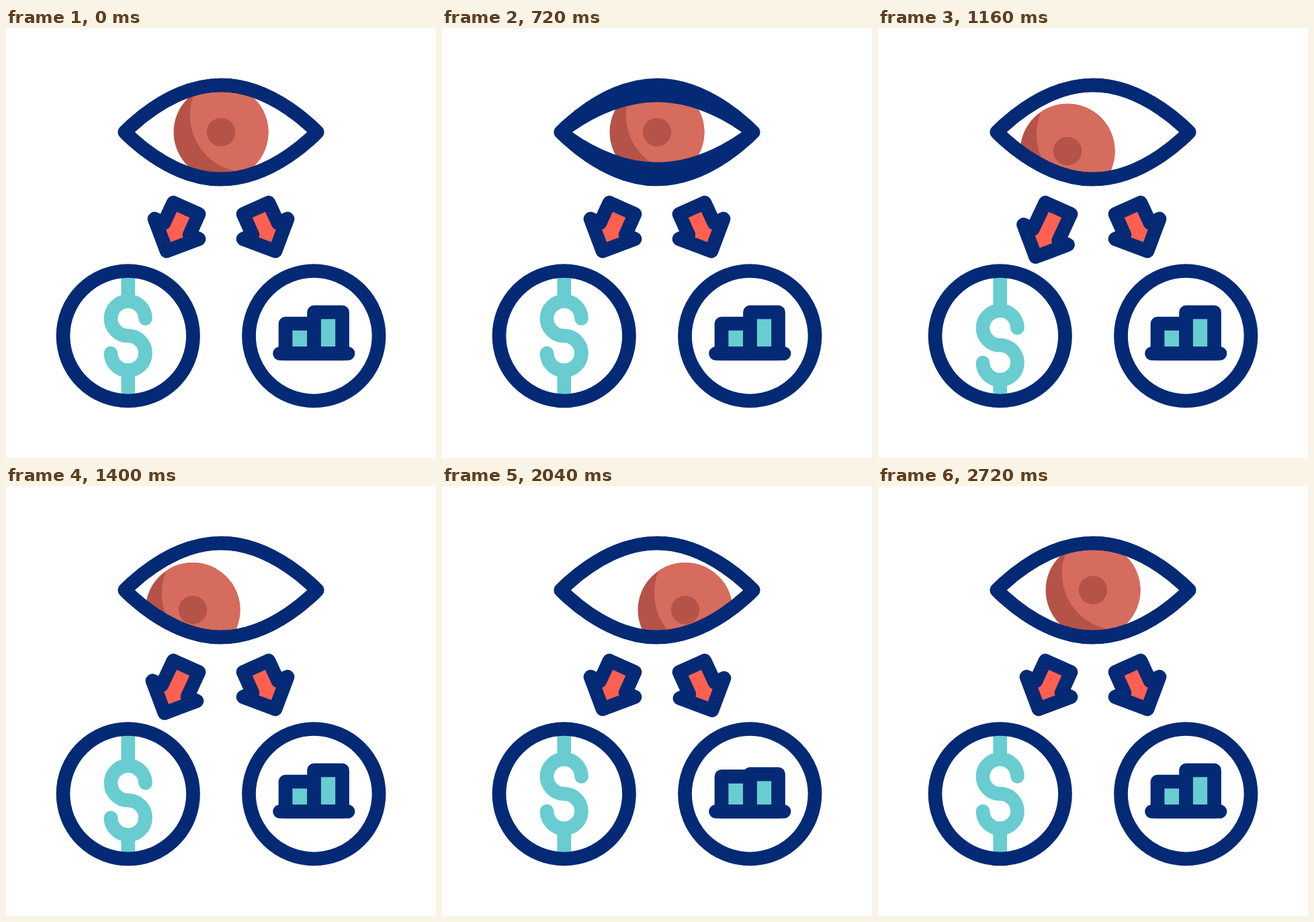
Write an HTML page that moves like this. It is 640 by 640 pixels and loops after 3000 ms.

```html
<!DOCTYPE html>
<html lang="en">
<head>
<meta charset="utf-8">
<style>
  html, body { margin: 0; width: 100%; height: 100%; overflow: hidden; background: #fff; }
  svg { display: block; width: 100%; height: 100%; }
  .line { stroke: #042a75; stroke-width: 20.7; stroke-linecap: round; stroke-linejoin: round; fill: none; }
  .teal { stroke: #69ccd1; }
  .bar { fill: #69ccd1; }
  .arrow { fill: #ff6052; }
  .lid { fill: #fddfbe; }
  .dark { fill: #b55348; }
</style>
</head>
<body>
<svg viewBox="0 0 640 640">
  <defs>
    <clipPath id="eyeClip"><path id="eyeShape"/></clipPath>
    <clipPath id="irisClip"><circle r="70.5"/></clipPath>
  </defs>

  <g clip-path="url(#eyeClip)">
    <g id="iris">
      <circle class="dark" r="70.5"/>
      <circle cx="38.6" cy="-25" r="84.8" fill="#d66c5d" clip-path="url(#irisClip)"/>
      <circle class="dark" r="21.2"/>
    </g>
  </g>
  <path id="upperFill" class="lid"/>
  <path id="lowerFill" class="lid"/>
  <path id="upperEdge" class="line"/>
  <path id="lowerEdge" class="line"/>
  <path id="outline" class="line"/>

  <path id="leftArrow" class="line arrow"/>
  <path id="rightArrow" class="line arrow" transform="matrix(-1 0 0 1 640 0)"/>

  <path id="stem" class="line teal" style="stroke-linecap: butt"/>
  <path id="dollar" class="line teal" d="M207.5 432.3A25.75 25.75 0 1 0 181.75 458.2A25.75 25.75 0 1 1 156 484.2"/>
  <circle class="line" cx="181.75" cy="458.25" r="96.75"/>

  <path id="bar1" class="line bar"/>
  <path id="bar2" class="line bar"/>
  <path class="line" d="M407.5 484.5H509"/>
  <circle class="line" cx="458.25" cy="458.25" r="96.75"/>
</svg>
<script>
const LOOP = 3000;
const el = id => document.getElementById(id);
const draw = (id, d) => el(id).setAttribute('d', d);

// Eased progress from 0 to 1 between two times
const ease = (t, start, end) => {
  const u = Math.min(1, Math.max(0, (t - start) / (end - start)));
  return u * u * (3 - 2 * u);
};
const pulse = (t, start, peak, end) => ease(t, start, peak) - ease(t, peak, end);
// Progress along one axis of a curved path
const bend = (p, control) => 2 * (1 - p) * p * control + p * p;

// Lid curve between the eye corners; apex is measured from the eye's middle
const lidCurve = apex => {
  const y = 155 + apex;
  return `M177 155C177 155 241 ${y} 320 ${y}S463 155 463 155`;
};
const lidBack = apex => {
  const y = 155 + apex;
  return `L463 155C463 155 399 ${y} 320 ${y}S177 155 177 155Z`;
};
const eyePath = lidCurve(-70) + lidBack(70);

// Arrow whose head slides away from a fixed tail
function arrowPath(shift) {
  const dx = -0.46 * shift, dy = 0.89 * shift;
  const head = (x, y) => `${x + dx} ${y + dy}`;
  return `M249 260L287 277L${head(273.2, 307.7)}L${head(287, 314)}` +
    `L${head(239, 332)}L${head(221, 284)}L${head(235, 290.4)}Z`;
}
const barPath = (left, right, top) => `M${left} 484.5V${top}H${right}V484.5Z`;

function render(t) {
  const apex = 70 * (1 - pulse(t, 80, 440, 450) - 0) ;
  const closed = ease(t, 80, 440) - ease(t, 450, 835);
  const gap = 70 * (1 - closed);
  for (const [name, side] of [['upper', -1], ['lower', 1]]) {
    draw(name + 'Fill', lidCurve(side * 70) + lidBack(side * gap));
    draw(name + 'Edge', lidCurve(side * gap));
  }

  const toLeft = ease(t, 745, 1250);
  const toRight = ease(t, 1415, 1865);
  const home = ease(t, 2170, 2710);
  const x = 320 - 42 * bend(toLeft, 0.4) + 84 * toRight - 42 * bend(home, 0.32);
  const y = 155 + 29.5 * (bend(toLeft, 0.75) - bend(home, 0.75));
  el('iris').setAttribute('transform', `translate(${x} ${y})`);

  const left = pulse(t, 917, 1250, 1583);
  draw('leftArrow', arrowPath(11.8 * left));
  draw('stem', `M181.75 362V${407 + 17 * left}M181.75 ${510 + 17 * left}V555`);
  el('dollar').setAttribute('transform', `translate(0 ${17 * left})`);

  const right = pulse(t, 1477, 1810, 2143);
  draw('rightArrow', arrowPath(9.6 * right));
  draw('bar1', barPath(416, 458.5, 440 - 34 * right));
  draw('bar2', barPath(458.5, 500.5, 423 + 26 * right));
}

draw('eyeShape', eyePath);
draw('outline', eyePath);
const begin = performance.now();
function frame() {
  render((performance.now() - begin) % LOOP);
  requestAnimationFrame(frame);
}
render(0);
requestAnimationFrame(frame);
</script>
</body>
</html>
```
